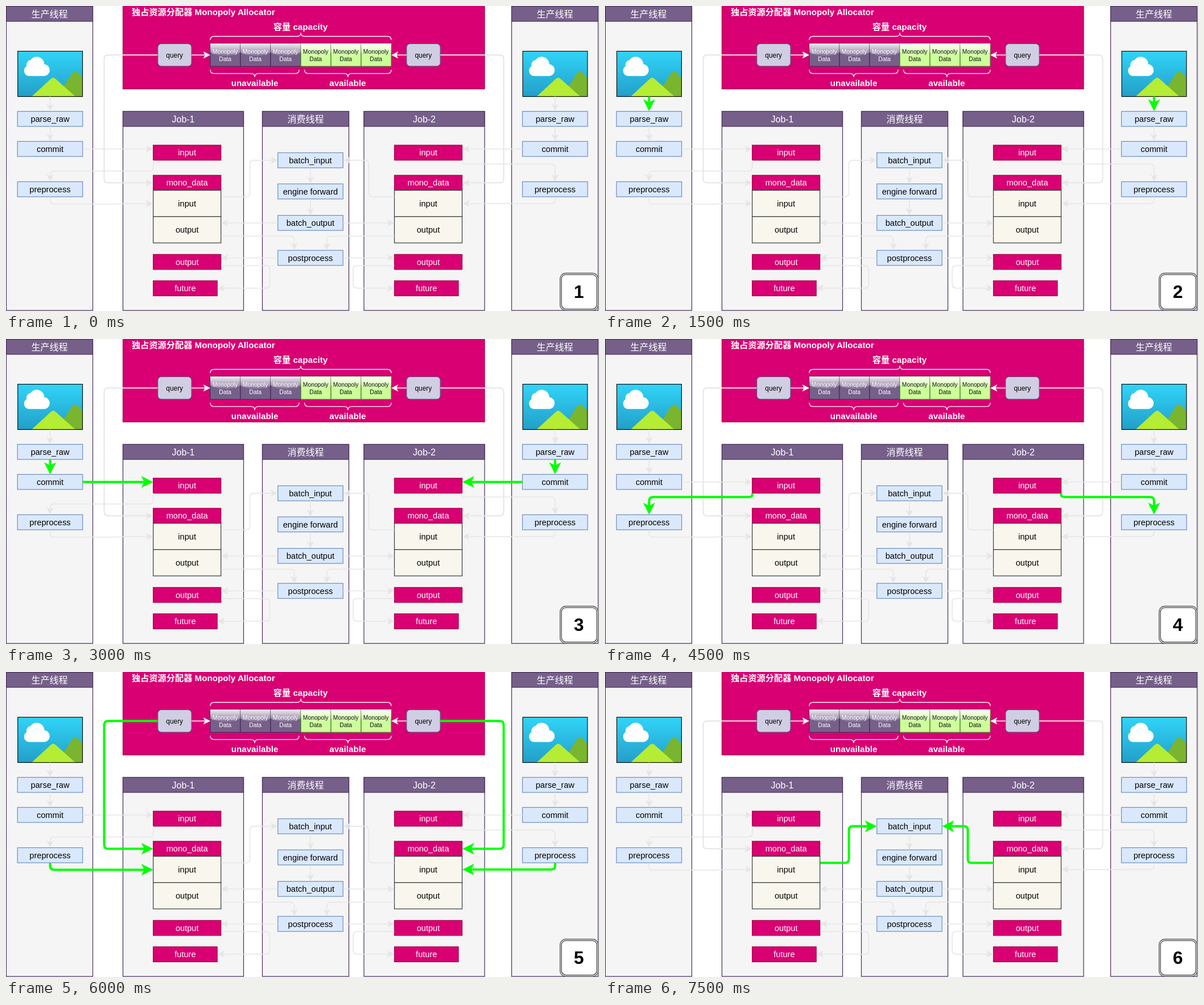
These frames come from a looping animation (1042x537 px, 8000 ms). An HTML page:

```html
<!DOCTYPE html>
<html lang="zh">
<head>
<meta charset="utf-8">
<title>Monopoly Allocator</title>
<style>
html, body { margin: 0; width: 100%; height: 100%; overflow: hidden; background: #fff; }
svg { display: block; width: 1042px; height: 537px; }
text { font-family: "Liberation Sans", Arial, "Noto Sans CJK SC", "Noto Sans CJK", sans-serif; }
</style>
</head>
<body>
<svg id="stage" viewBox="0 0 1042 537" xmlns="http://www.w3.org/2000/svg">
  <defs>
    <linearGradient id="sky" x2="0" y2="1">
      <stop stop-color="#31d4f8"/><stop offset="1" stop-color="#239fc9"/>
    </linearGradient>
    <linearGradient id="gloss" x2="0" y2="1">
      <stop stop-color="#fff" stop-opacity=".9"/><stop offset="1" stop-color="#fff" stop-opacity=".1"/>
    </linearGradient>
  </defs>
</svg>
<script>
const NS = 'http://www.w3.org/2000/svg';
const stage = document.getElementById('stage');
const STEP = 1500, LOOP = 8000;
const PINK = '#d80073', PINK_EDGE = '#a50040', PURPLE = '#76608a', PURPLE_EDGE = '#432d57';

function add(tag, attrs, parent = stage) {
  const el = document.createElementNS(NS, tag);
  for (const key in attrs) el.setAttribute(key, attrs[key]);
  parent.appendChild(el);
  return el;
}

function rect(x, y, width, height, fill, stroke, rx = 0) {
  return add('rect', { x, y, width, height, fill, stroke, rx, 'stroke-width': 1.2 });
}

function label(str, x, y, size = 14.6, fill = '#000', more = {}) {
  const el = add('text', {
    x, y: y + size * 0.355, 'font-size': size, fill, 'text-anchor': 'middle', ...more
  });
  el.textContent = str;
  return el;
}

const bold = (str, x, y, more) =>
  label(str, x, y, 15.2, '#fff', { 'font-weight': 700, ...more });

function box(str, x, y, w, h, fill, stroke, color) {
  rect(x, y, w, h, fill, stroke);
  label(str, x + w / 2, y + h / 2, 14.6, color);
}

const blue = (str, x, y) => box(str, x, y, 114.5, 26.5, '#dae8fc', '#6c8ebf');
const pink = (str, x, y, w = 119) => box(str, x, y, w, 26.5, PINK, PINK_EDGE, '#fff');
const cream = (str, x, y) => box(str, x, y, 119, 46.3, '#f9f7ed', '#36393d');

function lane(title, x, y, w) {
  rect(x, y, w, 536 - y, '#f5f5f5', PURPLE_EDGE);
  rect(x, y, w, 26.5, PURPLE, PURPLE_EDGE);
  label(title, x + w / 2, y + 13.5, 16, '#fff');
}

function picture(dx) {
  const g = add('g', { transform: `translate(${dx} 0)` });
  const shape = (d, fill) => add('path', { d, fill }, g);
  add('rect', { x: 20.7, y: 79.6, width: 113.8, height: 79.8, fill: 'url(#sky)' }, g);
  shape('M90 159.4 L115 120 Q121.500 111.500 128 119.500 L134.500 127 V159.400 Z', '#7ab530');
  shape('M45 159.400 L78 129 Q83 123.500 88 129 L122 159.400 Z', '#b5ec34');
  shape('M40 123.300 A9.500 9.500 0 0 1 36 106 A9 9 0 0 1 43 95 ' +
    'A13.500 13.500 0 0 1 67.500 102.500 A10.500 10.500 0 0 1 68 123.300 Z', '#fff');
  add('rect', { x: 20.7, y: 79.6, width: 113.8, height: 79.8, fill: 'none',
    stroke: '#000', 'stroke-width': 1.1 }, g);
}

function cell(x, free) {
  rect(x, 66, 53, 40.2, free ? '#ccff99' : PURPLE, free ? '#4d7a35' : PURPLE_EDGE);
  add('path', { d: `M${x} 66 h53 v16 q-26.500 12 -53 0 Z`, fill: 'url(#gloss)' });
  const color = free ? '#111' : '#fff';
  label('Monopoly', x + 26.2, 80, 10.3, color);
  label('Data', x + 26.2, 93, 10.3, color);
}

// Curly bracket from x1 to x2; dir is -1 when its tip points up.
function brace(x1, x2, y, dir) {
  const r = 6.5, s = dir * r, mid = (x1 + x2) / 2;
  add('path', {
    d: `M${x1} ${y - s} Q${x1} ${y} ${x1 + r} ${y} H${mid - r} Q${mid} ${y} ${mid} ${y + s} ` +
       `Q${mid} ${y} ${mid + r} ${y} H${x2 - r} Q${x2} ${y} ${x2} ${y - s}`,
    fill: 'none', stroke: '#fff', 'stroke-width': 1.3
  });
}

// "x y v 10 h 20" lists a start point followed by vertical and horizontal runs.
function parse(route) {
  const parts = route.split(' ');
  let x = +parts[0], y = +parts[1];
  const pts = [[x, y]];
  for (let i = 2; i < parts.length; i += 2) {
    if (parts[i] === 'h') x = +parts[i + 1]; else y = +parts[i + 1];
    pts.push([x, y]);
  }
  return pts;
}

function toward(a, b, dist) {
  const len = Math.hypot(b[0] - a[0], b[1] - a[1]) || 1;
  const k = Math.min(dist, len / 2) / len;
  return [a[0] + (b[0] - a[0]) * k, a[1] + (b[1] - a[1]) * k];
}

function arrow(route, color, width, size) {
  const pts = parse(route);
  const n = pts.length - 1;
  const [ex, ey] = pts[n], [px, py] = pts[n - 1];
  const len = Math.hypot(ex - px, ey - py);
  const ux = (ex - px) / len, uy = (ey - py) / len;
  const tip = [ex - ux * width * 1.118, ey - uy * width * 1.118];
  const back = (along, side) =>
    [tip[0] - ux * along - uy * side, tip[1] - uy * along + ux * side];
  const notch = back(size * 0.75, 0);

  let d = `M${pts[0]}`;
  for (let i = 1; i < n; i++) {
    d += `L${toward(pts[i], pts[i - 1], 7)}Q${pts[i]} ${toward(pts[i], pts[i + 1], 7)}`;
  }
  d += `L${notch}`;
  const g = add('g', { stroke: color, 'stroke-width': width, 'stroke-miterlimit': 10 });
  add('path', { d, fill: 'none' }, g);
  add('path', {
    d: `M${tip}L${back(size, size / 2)}L${notch}L${back(size, -size / 2)}Z`, fill: color
  }, g);
  return g;
}

const links = [];
function link(step, route, hot = route, width = 1.6) {
  links.push({ step, cold: arrow(route, '#e6e6e6', width, 9), hotRoute: hot });
}

// Lanes and boxes
rect(205.5, -2, 635.5, 148, PINK, PINK_EDGE);
lane('生产线程', 0.5, 0.5, 152);
lane('生产线程', 888.5, 0.5, 152);
lane('Job-1', 205.5, 185.5, 212);
lane('消费线程', 450.5, 185.5, 152);
lane('Job-2', 629, 185.5, 212);

for (const dx of [0, 887.3]) {
  picture(dx);
  blue('parse_raw', 20.2 + dx, 185.5);
  blue('commit', 20.2 + dx, 238.4);
  blue('preprocess', 20.2 + dx, 309.4);
}
for (const x of [258.7, 682.5]) {
  pink('input', x, 245);
  pink('mono_data', x, 298);
  cream('input', x, 324.5);
  cream('output', x, 370.8);
  pink('output', x, 437.4);
  pink('future', x, 483.8, 112.5);
}
blue('batch_input', 477.7, 258.4);
blue('engine forward', 477.7, 313.2);
blue('batch_output', 477.7, 368.6);
blue('postprocess', 477.7, 430.2);

// Allocator
bold('独占资源分配器 Monopoly Allocator', 221, 10.5, { 'text-anchor': 'start' });
bold('容量 capacity', 517.5, 37);
bold('unavailable', 437, 136);
bold('available', 600.3, 136);
brace(359, 677, 53.5, -1);
brace(359, 515, 118.8, 1);
brace(524.5, 677, 118.8, 1);
for (let i = 0; i < 6; i++) cell(359 + i * 53, i > 2);
for (const x of [266.7, 703.8]) {
  rect(x, 66.5, 59.4, 39.5, '#d0cee2', '#56517e', 6);
  label('query', x + 29.5, 86.3, 11.9);
}
arrow('326 86.3 h 359', '#fff', 1.5, 9);
arrow('704 86.3 h 677', '#fff', 1.5, 9);

// Links that light up, by step
link(2, '77.5 159.5 v 185');
link(2, '964.8 159.5 v 185');
link(3, '77.5 212 v 238');
link(3, '964.8 212 v 238');
link(3, '134.7 251.7 h 258.5');
link(3, '907.5 251.7 h 802');
link(4, '258.9 271.5 v 290.5 h 77.5 v 309', '258.9 271.5 v 278.2 h 77.5 v 309');
link(4, '801.5 271.5 v 278.2 h 964.8 v 309');
link(5, '266.5 86.3 h 172.5 v 311.2 h 258.5', undefined, 2);
link(5, '763.2 86.3 h 874.5 v 311.2 h 802', undefined, 2);
link(5, '77.5 336 v 348.7 h 199 v 347.7 h 258.5', '77.5 336 v 348.2 h 258.5');
link(5, '964.8 336 v 347.7 h 802');
link(6, '378 336 h 428.5 v 271.6 h 477.5');
link(6, '682.5 336 h 637.5 v 271.6 h 592.5');

// Links that stay quiet in this part
link(0, '535 285 v 313');
link(0, '535 340 v 368.5');
link(0, '477.5 382 h 378');
link(0, '592.5 382 h 682.5');
link(0, '378 405.2 h 506.5 v 430');
link(0, '682.5 405.2 h 563.7 v 430');
link(0, '477.5 443.5 h 378');
link(0, '592.5 443.5 h 682.5');
link(0, '378 457 h 463.5 v 496.8 h 371.5');
link(0, '682.5 457 h 610 v 496.8 h 682.5');

for (const l of links) {
  if (l.step) l.hot = arrow(l.hotRoute, '#00ff00', 4, 11.9);
}

// Step badge
rect(973.6, 470.4, 67, 65.6, '#fff', '#444', 10);
rect(976, 472.8, 62.2, 60.8, '#fff', '#333', 8);
const badge = label('1', 1006.7, 503, 31.8, '#000', { 'font-weight': 700 });

function update(time) {
  const step = Math.floor((time % LOOP) / STEP) + 1;
  badge.textContent = step;
  for (const l of links) {
    if (!l.step) continue;
    const on = l.step === step;
    l.hot.style.display = on ? '' : 'none';
    l.cold.style.display = on ? 'none' : '';
  }
}

const start = performance.now();
function tick() {
  update(performance.now() - start);
  requestAnimationFrame(tick);
}
tick();
</script>
</body>
</html>
```
